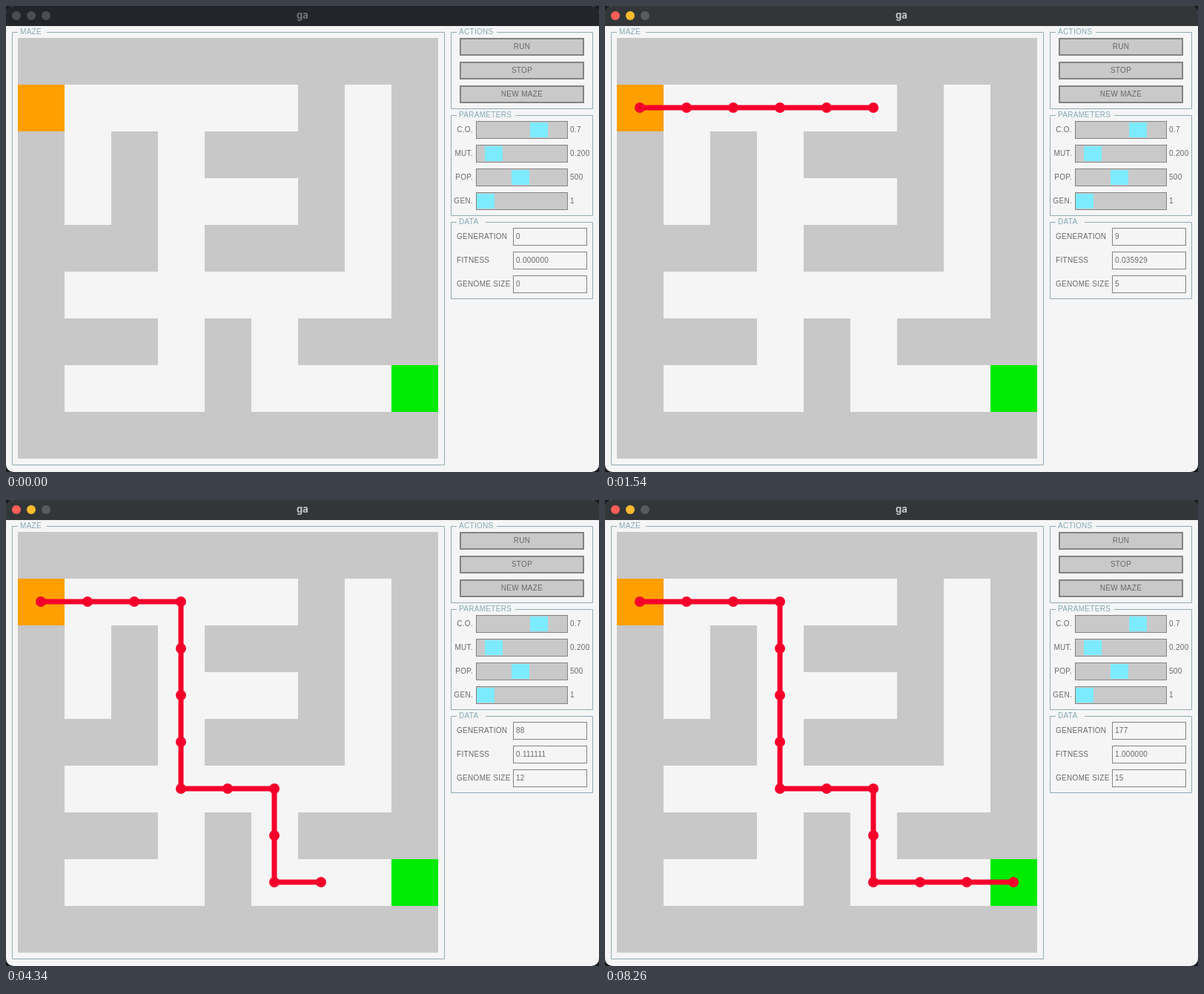
Animation, 800 px wide and 628 px high, one loop 8680 ms. Source, as an HTML page:

```html
<!DOCTYPE html>
<html lang="en">
<head>
<meta charset="utf-8">
<title>ga</title>
<style>
  html, body { margin: 0; width: 100%; height: 100%; overflow: hidden; background: #17191b; }
  svg { display: block; width: 800px; height: 628px; }
  text { font: 10px "Liberation Sans", Arial, sans-serif; letter-spacing: .3px; fill: #686868; }
  .title { font: 700 13px Inter, Roboto, sans-serif; letter-spacing: 0; fill: #75787a; text-anchor: middle; }
  .bar { fill: #22262a; }
  .light { fill: #4b4e51; }
  .active .bar { fill: #323638; }
  .active .title { fill: #c6c8c9; }
  .active .close { fill: #ff5f57; }
  .active .minimize { fill: #febc2e; }
  .active .zoom { fill: #595c5e; }
  .panel { fill: none; stroke: #90abb5; }
  .caption { fill: #84a8b4; }
  .button rect { fill: #c9c9c9; stroke: #838383; stroke-width: 2; }
  .button text { text-anchor: middle; }
  .button.hover rect { fill: #bfedff; stroke: #42b3dd; }
  .button.hover text { fill: #5f9fc2; }
  .button.down rect { fill: #7debff; stroke: #0492c7; }
  .button.down text { fill: #368baf; }
  .track { fill: #c9c9c9; stroke: #838383; }
  .thumb { fill: #7debff; }
  .field { fill: #f5f5f5; stroke: #838383; }
  .end { text-anchor: end; }
  #route { fill: none; stroke: #f5002b; stroke-width: 7; }
  #dots { fill: #f5002b; }
</style>
</head>
<body>
<svg id="stage" viewBox="0 0 800 628"></svg>
<script>
const LOOP = 8680, TICK = 70, CELL = 63, LEFT = 16, TOP = 43;
const stage = document.getElementById('stage');

function add(tag, attrs, parent = stage, content = '') {
  const node = document.createElementNS('http://www.w3.org/2000/svg', tag);
  for (const key in attrs) node.setAttribute(key, attrs[key]);
  node.textContent = content;
  parent.append(node);
  return node;
}
const rect = (x, y, width, height, attrs, parent) =>
  add('rect', { x, y, width, height, ...attrs }, parent);
const label = (x, centre, content, cls = '', parent) =>
  add('text', { x, y: centre + 3.5, class: cls }, parent, content);

function panel(x, y, width, height, name, gap) {
  add('path', { class: 'panel', d: `M${x + 8} ${y + .5}H${x + .5}V${y + height - .5}H${x + width - .5}V${y + .5}H${x + gap}` });
  label(x + 11, y - .5, name, 'caption');
}

// Window
rect(0, 0, 800, 628, { rx: 10, fill: '#f5f5f5' });
add('path', { class: 'bar', d: 'M0 27V10Q0 0 10 0H790Q800 0 800 10V27Z' });
['close', 'minimize', 'zoom'].forEach((name, i) =>
  add('circle', { class: 'light ' + name, cx: 14 + 20 * i, cy: 13, r: 6 }));
add('text', { class: 'title', x: 400, y: 17 }, stage, 'ga');

// Maze
const maze = [
  '#########',
  'S.....#.#',
  '#.#.###.#',
  '#.#...#.#',
  '###.###.#',
  '#.......#',
  '###.#.###',
  '#...#...E',
  '#########'
];
const fills = { '.': '#f5f5f5', S: '#ff9f00', E: '#00eb02' };
panel(8, 35, 584, 584, 'MAZE', 47);
rect(LEFT, TOP, 9 * CELL, 9 * CELL, { fill: '#c8c8c8' });
maze.forEach((row, r) => [...row].forEach((kind, c) => {
  if (fills[kind]) rect(LEFT + c * CELL, TOP + r * CELL, CELL, CELL, { fill: fills[kind], 'shape-rendering': 'crispEdges' });
}));
const route = add('polyline', { id: 'route' });
const dots = add('g', { id: 'dots' });

// Side panels
panel(600, 35, 192, 104, 'ACTIONS', 62);
const buttons = ['RUN', 'STOP', 'NEW MAZE'].map((name, i) => {
  const y = 43 + 32 * i, group = add('g', { class: 'button' });
  rect(613, y + 1, 166, 22, {}, group);
  label(696, y + 11.5, name, '', group);
  return group;
});

panel(600, 147, 192, 136, 'PARAMETERS', 87);
[['C.O.', 707, '0.7'], ['MUT.', 646, '0.200'], ['POP.', 682, '500'], ['GEN.', 635, '1']].forEach(([name, x, value], i) => {
  const y = 155 + 32 * i;
  label(630, y + 11.5, name, 'end');
  rect(634.5, y + .5, 123, 23, { class: 'track' });
  rect(x, y + 2, 24, 20, { class: 'thumb' });
  label(761, y + 11.5, value);
});

panel(600, 291, 192, 104, 'DATA', 47);
const fields = ['GENERATION', 'FITNESS', 'GENOME SIZE'].map((name, i) => {
  const y = 299 + 32 * i;
  label(608, y + 11.5, name);
  rect(684.5, y + .5, 99, 23, { class: 'field' });
  return label(688, y + 11.5, '');
});

// [time, generation]
const progress = [[1225, 0], [1540, 9], [3290, 59], [5460, 120], [6300, 145], [7420, 177]];
// [first generation, best route, genome size]
const solution = 'RRRDDDDRRDDRRR';
const best = [
  [0, '', 0],
  [1, 'RRR', 3],
  [4, 'RRRRR', 5],
  [18, solution.slice(0, 6), 6],
  [26, solution.slice(0, 7), 7],
  [32, solution.slice(0, 9), 9],
  [38, solution.slice(0, 11), 11],
  [44, solution.slice(0, 12), 12],
  [137, solution.slice(0, 13), 14],
  [177, solution, 15]
];
// [time, button index, state]
const pointer = [[0, -1, ''], [490, 2, 'hover'], [560, 1, 'hover'], [770, 0, 'hover'],
  [1190, 0, 'down'], [1260, 0, 'hover'], [1400, -1, '']];

const latest = (list, value) => list.filter(item => item[0] <= value).pop();

function generationAt(t) {
  if (t <= progress[0][0]) return 0;
  const next = progress.findIndex(point => point[0] > t);
  if (next < 0) return progress[progress.length - 1][1];
  const [t0, g0] = progress[next - 1], [t1, g1] = progress[next];
  return Math.floor(g0 + (g1 - g0) * (t - t0) / (t1 - t0) + 1e-6);
}

function drawRoute(moves) {
  let col = 0, row = 1;
  const cells = [[col, row]];
  for (const move of moves) {
    move === 'R' ? col++ : row++;
    cells.push([col, row]);
  }
  const points = moves ? cells.map(([c, r]) => [LEFT + 31 + c * CELL, TOP + 31 + r * CELL]) : [];
  route.setAttribute('points', points.join(' '));
  dots.replaceChildren();
  points.forEach(([cx, cy]) => add('circle', { cx, cy, r: 7 }, dots));
  return moves ? 1 / (1 + 4 * Math.hypot(8 - col, 7 - row)) : 0;
}

function draw(t) {
  const generation = generationAt(t);
  const [, moves, size] = latest(best, generation);
  const [, target, state] = latest(pointer, t);
  stage.classList.toggle('active', t >= 1190);
  buttons.forEach((button, i) => button.setAttribute('class', 'button ' + (i === target ? state : '')));
  const fitness = drawRoute(moves);
  [generation, fitness.toFixed(6), size].forEach((value, i) => fields[i].textContent = value);
}

let shown = -1;
const start = performance.now();
function frame() {
  const t = Math.floor((performance.now() - start) % LOOP / TICK) * TICK;
  if (t !== shown) draw(shown = t);
  requestAnimationFrame(frame);
}
frame();
</script>
</body>
</html>
```
